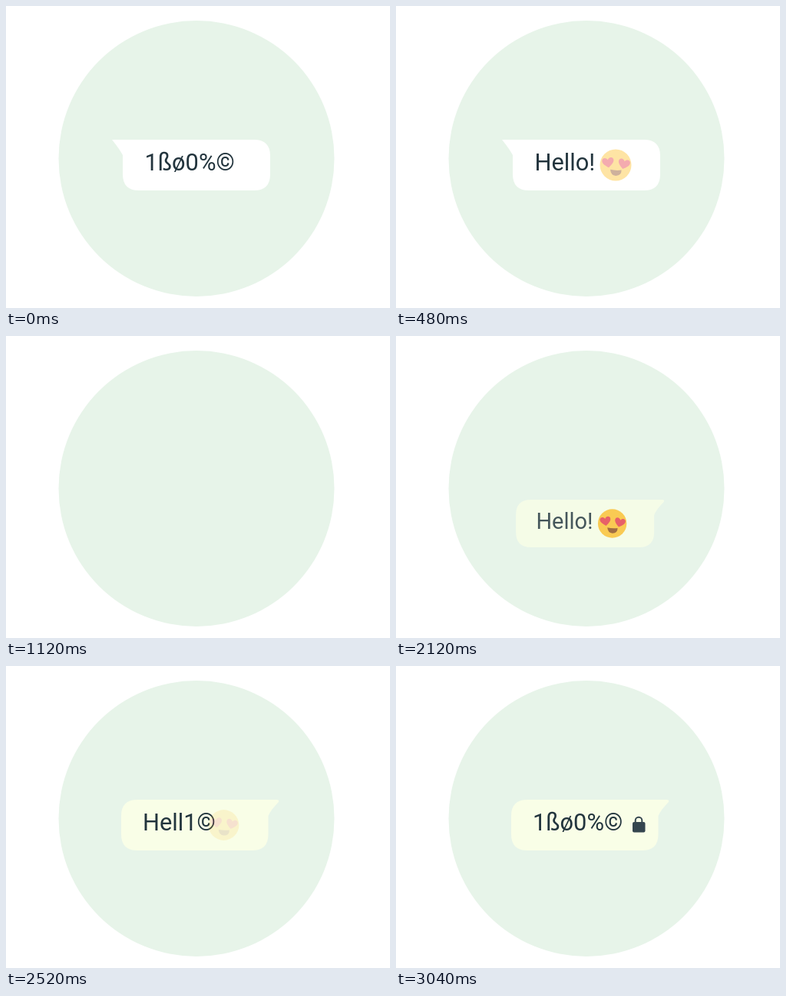
Write an HTML page that moves like this. It is 500 px wide and 393 px high and loops after 3100 ms.

```html
<!DOCTYPE html>
<html lang="en">
<head>
<meta charset="utf-8">
<title>Encrypted message</title>
<style>
  html, body { margin: 0; width: 100%; height: 100%; overflow: hidden; background: #fff; }
  svg { display: block; width: 100%; height: 100%; }
  text { font: 30.8px Roboto, sans-serif; fill: #22343d; }
</style>
</head>
<body>
<svg viewBox="0 0 500 393">
  <defs>
    <path id="heart" fill="#e8414c" d="M0 6.6C-4 3.6-7.6.8-7.6-2.6C-7.6-6.8-2-7.6 0-3.4C2-7.6 7.6-6.8 7.6-2.6C7.6.8 4 3.6 0 6.6Z"/>
    <g id="face">
      <circle r="20.5" fill="#fec233"/>
      <use href="#heart" transform="translate(-9.8 -3.3) rotate(-8)"/>
      <use href="#heart" transform="translate(10.8 -1.4) rotate(14)"/>
      <path fill="#91501f" d="M-7 5.8Q0 7.6 7.6 6.6Q7.6 13.8.2 14Q-6.4 13.4-7 5.8Z"/>
    </g>
  </defs>
  <circle cx="248" cy="198.5" r="179.5" fill="#e7f4e9"/>
  <g id="sent">
    <path fill="#fff" d="M138 174H323Q344 174 344 195V219Q344 240 323 240H173Q152 240 152 219V194Q147 185 138 174Z"/>
    <text id="sentText" x="180.5" y="214"></text>
    <g id="sentFace" transform="translate(286 207)"><use href="#face"/></g>
  </g>
  <g id="reply">
    <path fill="#f9fee7" d="M171 174H353Q356.500 174.500 354.500 177.500Q345 187 341.500 195V219Q341.500 240 320.500 240H171Q150 240 150 219V195Q150 174 171 174Z"/>
    <text id="replyText" x="178" y="214"></text>
    <g id="replyFace" transform="translate(283.500 207) scale(.97)"><use href="#face"/></g>
    <g id="lock">
      <path d="M311.700 204V201A4.300 4.300 0 0 1 320.300 201V204" fill="none" stroke="#34454e" stroke-width="2"/>
      <rect x="308" y="203" width="16.500" height="13.500" rx="2" fill="#34454e"/>
    </g>
  </g>
</svg>
<script>
const LOOP = 3100, STEP = 20;
const PLAIN = 'Hello!', CIPHER = '1ßø0%©', GLYPHS = '1ß©ø%0';
const el = id => document.getElementById(id);
const [sent, sentText, sentFace, reply, replyText, replyFace, lock] =
  ['sent', 'sentText', 'sentFace', 'reply', 'replyText', 'replyFace', 'lock'].map(el);

const ramp = (t, from, to) => Math.min(1, Math.max(0, (t - from) / (to - from)));
const easeOut = p => 1 - (1 - p) ** 2;
const easeInOut = p => p < .5 ? 2 * p * p : 1 - 2 * (1 - p) ** 2;

// One letter at a time flickers between its old and new shape.
function scramble(t, from, to, start, perChar, reverse) {
  const n = Math.floor(t / STEP);
  return [...from].map((c, i) => {
    const order = reverse ? from.length - 1 - i : i;
    const age = t - start - order * perChar;
    if (age < 0) return c;
    if (age >= perChar) return to[i];
    return GLYPHS[(n * n + 2 * i + 4) % GLYPHS.length];
  }).join('');
}

function pose(node, dy, scale, opacity) {
  node.setAttribute('transform',
    `translate(252.3 ${207 + dy}) scale(${scale}) translate(-252.3 -207)`);
  node.setAttribute('opacity', opacity);
}

function draw(t) {
  const leave = easeInOut(ramp(t, 840, 1120));
  pose(sent, -42 * leave, 1 - .08 * leave, 1 - leave);
  sentText.textContent = scramble(t, CIPHER, PLAIN, 40, 65, false);
  sentFace.setAttribute('opacity', easeOut(ramp(t, 420, 660)));

  const enter = easeOut(ramp(t, 2120, 2240));
  pose(reply, 37 * (1 - enter), .94 + .06 * enter, t < 2120 ? 0 : .82 + .18 * enter);
  replyText.textContent = scramble(t, PLAIN, CIPHER, 2430, 85, true);
  replyFace.setAttribute('opacity', 1 - easeOut(ramp(t, 2440, 2570)));
  lock.setAttribute('opacity', easeOut(ramp(t, 2800, 3040)));
}

const begin = performance.now();
function tick() {
  const t = (performance.now() - begin) % LOOP;
  draw(Math.floor(t / STEP) * STEP);
  requestAnimationFrame(tick);
}
tick();
</script>
</body>
</html>
```
